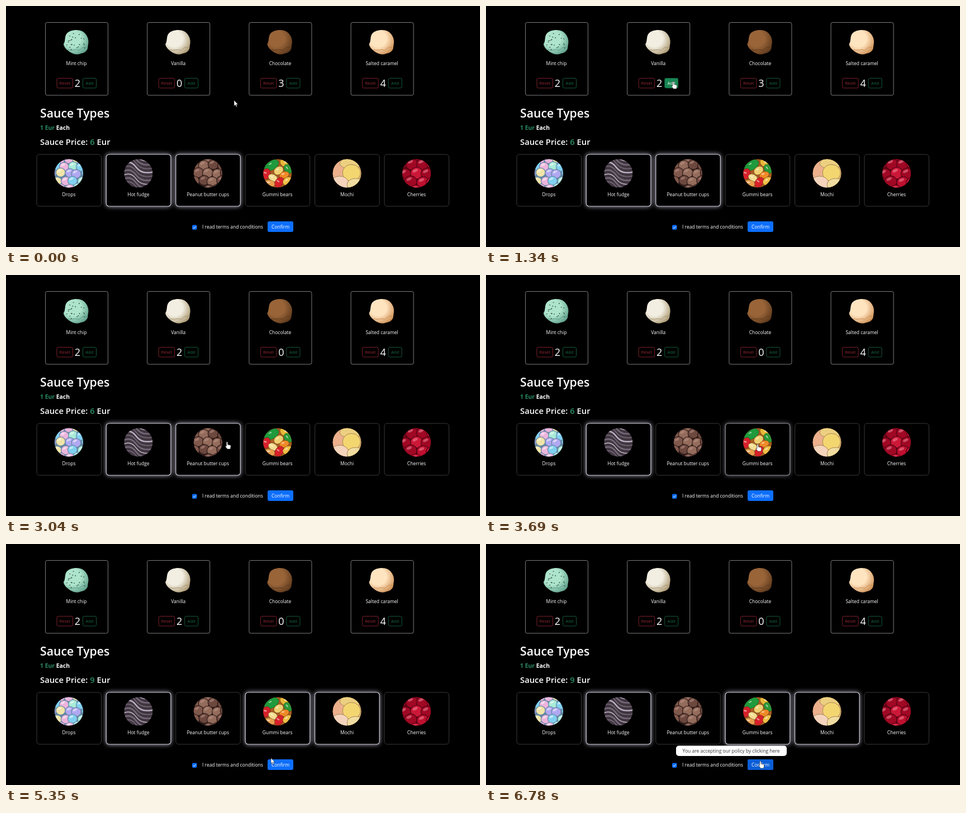
An HTML page that plays this animation: 848 px wide and 432 px high, repeating every 6830 ms.

```html
<!DOCTYPE html>
<html lang="en">
<head>
<meta charset="utf-8">
<title>Sundae order</title>
<style>
  html, body { margin: 0; height: 100%; overflow: hidden; background: #000; }
  svg { display: block; width: 848px; height: 432px; font-family: "Open Sans", "Noto Sans", sans-serif; }
</style>
</head>
<body>
<svg id="stage" viewBox="0 0 848 432"></svg>
<script>
const LOOP = 6830;
const WHITE = '#fff', RED = '#9c2835', GREEN = '#176c48';
const $ = id => document.getElementById(id);

// ---- drawing helpers -------------------------------------------------
const text = (x, y, str, size, o = '') => `<text x="${x}" y="${y}" font-size="${size}" fill="${WHITE}" ${o}>${str}</text>`;
const label = (x, y, str, size = 8.5, o = '') => text(x, y, str, size, 'text-anchor="middle" ' + o);
const box = (x, y, w, h, r, o) => `<rect x="${x}" y="${y}" width="${w}" height="${h}" rx="${r}" ${o}/>`;
const blob = (x, y, rx, ry, fill, turn = 0, o = '') =>
  `<ellipse rx="${rx}" ry="${ry}" fill="${fill}" transform="translate(${x} ${y}) rotate(${turn})" ${o}/>`;

function random(seed) {
  return () => (seed = (seed * 16807) % 2147483647) / 2147483647;
}

// Loose heap of round sweets on a staggered grid
function heap(seed, r, colors, edge, shine) {
  const rnd = random(seed);
  let out = '';
  for (let row = -2; row <= 2; row++)
    for (let col = -2; col <= 2; col++) {
      const x = (col + (row & 1) / 2) * r * 1.75 + rnd() * 4 - 2;
      const y = row * r * 1.5 + rnd() * 4 - 2;
      const fill = colors[Math.floor(rnd() * colors.length)];
      out += blob(x, y, r, r * .94, fill, 0, `stroke="${edge}" stroke-width="1.2"`)
           + blob(x - r * .25, y - r * .4, r * .45, r * .22, shine, -25, 'opacity=".5"');
    }
  return out;
}

// Glossy folds running down to the right
function fudge() {
  let out = '';
  for (let i = 0; i < 10; i++) {
    const y = -34 + i * 7;
    out += `<path d="M-28 ${y - 4}Q-14 ${y - 12} -4 ${y + 2}T28 ${y + 10}" fill="none"
      stroke="${i % 3 ? '#75687a' : '#b8acc0'}" stroke-width="${1.6 + i % 2}"/>`;
  }
  return out;
}

const gummies = () => [
  [16, -18, 12, 8, '#e8b838', 25], [-11, -15, 14, 9, '#1f9a3c', -25], [19, -8, 9, 7, '#2a9838', 50],
  [-20, 1, 7, 10, '#d8202a', 15], [2, -5, 9, 7, '#f0d070', -35], [-8, 8, 9, 6, '#f4dc90', 30],
  [12, 3, 9, 6, '#f08a26', -20], [-14, 18, 10, 6, '#e8a050', 10], [3, 16, 7, 10, '#d82028', 35],
  [18, 14, 9, 7, '#f0c048', -30]
].map(a => blob(...a, 'stroke="#0004"') + blob(a[0] - 2, a[1] - 2, 3, 1.2, '#fff8', a[5])).join('');

const mochi = () => [
  [-16, -4, 14, 20, '#ecb08c', 10], [6, -18, 19, 10, '#eccf80', 0], [8, -1, 16, 15, '#f4d670', 0],
  [-13, 18, 16, 13, '#f4d4bc', 0], [15, 20, 15, 11, '#f0dca0', 0]
].map(a => blob(...a, 'stroke="#a88858" stroke-width="1"')).join('');

// ---- scene data ------------------------------------------------------
const flavours = [
  ['Mint chip', '#aee4cc', '#5c9c88'], ['Vanilla', '#f2eee2', '#a8946c'],
  ['Chocolate', '#986438', '#5c381c'], ['Salted caramel', '#ffe4c0', '#cc8c50']
].map(([name, light, dark], i) => ({ name, light, dark, x: 70.5 + i * 182.2 }));

const sauces = [
  ['Drops', '#6484a0', heap(11, 8.5, ['#80d0f0', '#a8ecd8', '#ecb4dc', '#f0e4a8', '#b0a8f0'], '#6888a8', '#fff')],
  ['Hot fudge', '#40363f', fudge()],
  ['Peanut butter cups', '#2c1c1a', heap(7, 9.5, ['#80594c', '#6c483e', '#946c5c'], '#2c1a18', '#c0988c')],
  ['Gummi bears', '#a85c20', gummies()],
  ['Mochi', '#d8b070', mochi()],
  ['Cherries', '#640414', heap(23, 11, ['#c01030', '#a00824', '#cc1838'], '#580414', '#f890a4')]
].map(([name, base, art], i) => ({ name, base, art, x: 55 + i * 124.4 }));

const smallButton = (id, x, w, str, color) =>
  box(x, 129.5, w, 17.5, 2.5, `id="${id}" fill="${color}" fill-opacity="0" stroke="${color}" stroke-width=".8"`)
  + label(x + w / 2, 141, str, 7.5, `id="${id}Text" style="fill:${color}"`);

const scoopPath = 'M103 68C107 63 104 55 109 49C114 43 128 41 136 45C145 50 149 60 147 69C146 73 147 77 144 80C140 85 136 84 132 86C124 88 117 85 111 80C107 77 103 72 103 68Z';

function flavourCard({ name, x, light, dark }, i) {
  const rnd = random(5);
  let chips = '';
  for (let k = 0; k < 24 && i === 0; k++)
    chips += blob(109 + rnd() * 33, 48 + rnd() * 33, 1, .8, '#28483c');
  return `<radialGradient id="cream${i}" cx=".36" cy=".36" r=".75"><stop offset=".45" stop-color="${light}"/><stop offset="1" stop-color="${dark}"/></radialGradient>`
    + box(x, 29.5, 112, 130.5, 3, 'fill="#000" stroke="#7c7c7c"')
    + `<g transform="translate(${x - 70.5})"><path d="${scoopPath}" fill="url(#cream${i})"/>
       <path d="M111 78C118 81 124 77 129 79S133 72 145 74" fill="none" stroke="${dark}"/>${chips}</g>`
    + label(x + 55.5, 106, name)
    + smallButton('reset' + i, x + 20.5, 28.5, 'Reset', RED)
    + label(x + 57.5, 145.3, '', 18, `id="count${i}"`)
    + smallButton('add' + i, x + 67, 24, 'Add', GREEN);
}

const sauceCard = ({ name, base, art, x }, i) =>
  box(x, 266, 115.5, 93, 5, `id="glow${i}" fill="#c4c0d0" filter="url(#blur)"`)
  + box(x, 266, 115.5, 93, 5, 'fill="#000" stroke="#383838"')
  + box(x, 266, 115.5, 93, 5, `id="ring${i}" fill="none" stroke="#c8c4d2" stroke-width="1.2"`)
  + `<g transform="translate(${x + 57.5} 300)" clip-path="url(#round)">${blob(0, 0, 26, 26, base)}${art}</g>`
  + label(x + 57.5, 341, name);

$('stage').innerHTML = `
  <defs>
    <filter id="blur" x="-20%" y="-20%" width="140%" height="140%"><feGaussianBlur stdDeviation="4.5"/></filter>
    <clipPath id="round"><circle r="25.5"/></clipPath>
  </defs>
  <rect width="848" height="432"/>
  ${flavours.map(flavourCard).join('')}
  ${text(61, 200, 'Sauce Types', 21.2, 'font-weight="600"')}
  ${text(61, 221.5, `<tspan fill="#2a8a62">1 Eur</tspan> Each`, 10.4, 'font-weight="700"')}
  ${text(61, 249, `Sauce Price: <tspan id="price" fill="#2a8a62"></tspan> Eur`, 14.8, 'font-weight="600"')}
  ${sauces.map(sauceCard).join('')}
  ${box(333, 392.5, 8.5, 8.5, 2, 'fill="#0d6efd"')}
  <path d="M335 397l1.6 1.6 3-3.6" fill="none" stroke="#fff"/>
  ${text(351, 399, 'I read terms and conditions', 8.5)}
  ${box(468, 386, 46, 19, 3, 'fill="#0d6efd"')}
  ${box(468, 386, 46, 19, 3, 'id="confirm" fill="#0b5ed7"')}
  ${label(491, 399, 'Confirm')}
  <g id="tip">${box(340, 361.5, 198, 18.5, 5, 'fill="#fff"')}
    ${label(438.5, 374.2, 'You are accepting our policy by clicking here', 8.5, 'style="fill:#333"')}</g>
  <g id="cursor" fill="#fff" stroke="#222" stroke-width=".6" stroke-linejoin="round">
    <path id="arrow" d="M0 0V10.2L2.3 8.1L3.9 11.8L5.5 11.1L3.9 7.5H7Z"/>
    <path id="hand" d="M-1.2 1Q0-1 1.1 1V5L5.5 6Q7 6.4 6.7 8L5.8 13H.3L-3 8.6Q-3.2 7-1.2 8Z"/>
  </g>`;

// ---- motion ----------------------------------------------------------
const route = [
  [0, 408, 169], [180, 408, 169], [740, 335, 135.5], [1340, 335, 135.5], [2080, 467, 136],
  [2400, 467, 136], [3040, 395.5, 299], [3130, 395.5, 299], [3560, 486, 303], [3680, 486, 303],
  [4180, 597, 300], [4470, 597, 300], [4750, 588, 330], [4930, 588, 330], [5350, 474, 383.5],
  [5540, 491, 389], [LOOP, 491, 389]
];
const clamp = v => Math.max(0, Math.min(1, v));
const ramp = (t, start) => clamp((t - start) / 150);

function cursorAt(t) {
  const i = Math.max(1, route.findIndex(p => p[0] >= t));
  const [t0, x0, y0] = route[i - 1], [t1, x1, y1] = route[i];
  const u = clamp((t - t0) / (t1 - t0)), e = u * u * (3 - 2 * u);
  return [x0 + (x1 - x0) * e, y0 + (y1 - y0) * e];
}

const inside = ([x, y], l, t, w, h) => x >= l && x <= l + w && y >= t && y <= t + h;

// Share of the last 150 ms the pointer spent over a box
function hover(t, ...area) {
  let hits = 0;
  for (let k = 0; k < 15; k++) hits += inside(cursorAt(Math.max(0, t - k * 10)), ...area);
  return hits / 15;
}

function paintButton(id, color, solid, level) {
  $(id).setAttribute('fill', solid);
  $(id).setAttribute('fill-opacity', level);
  $(id + 'Text').style.fill = level > .5 ? WHITE : color;
}

function draw(now) {
  const t = now % LOOP, at = cursorAt(t);
  const counts = [2, (t >= 920) + (t >= 1200), t < 2170 ? 3 : 0, 4];
  const chosen = [0, 1, 1 - ramp(t, 3130), ramp(t, 3600), ramp(t, 4180), 0];
  let pointing = inside(at, 468, 386, 46, 19);

  flavours.forEach(({ x }, i) => {
    const reset = [x + 20.5, 129.5, 28.5, 17.5], add = [x + 67, 129.5, 24, 17.5];
    $('count' + i).textContent = counts[i];
    paintButton('reset' + i, RED, '#dc3545', hover(t, ...reset));
    paintButton('add' + i, GREEN, '#198754', hover(t, ...add));
    pointing ||= inside(at, ...reset) || inside(at, ...add);
  });
  sauces.forEach(({ x }, i) => {
    $('glow' + i).style.opacity = $('ring' + i).style.opacity = chosen[i];
    pointing ||= inside(at, x, 266, 115.5, 93);
  });

  $('price').textContent = 3 * chosen.filter((v, i) => v > 0 && (i !== 2 || v === 1)).length;
  $('confirm').style.opacity = $('tip').style.opacity = hover(t, 468, 386, 46, 19);
  $('cursor').setAttribute('transform', `translate(${at})`);
  $('arrow').style.display = pointing ? 'none' : '';
  $('hand').style.display = pointing ? '' : 'none';
}

const start = performance.now();
function tick() {
  draw(performance.now() - start);
  requestAnimationFrame(tick);
}
tick();
</script>
</body>
</html>
```
